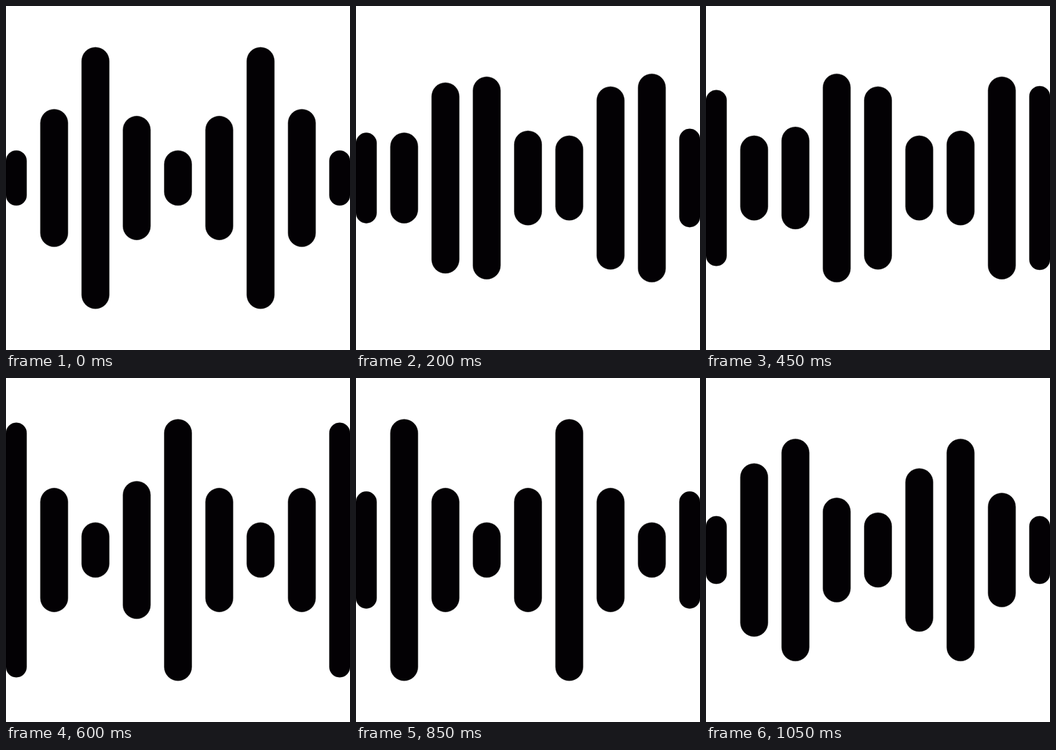
Write an HTML page that moves like this. It is 498x498 px and loops after 1.1 s.

```html
<!DOCTYPE html>
<html lang="en">
<head>
<meta charset="utf-8">
<title>Sound wave</title>
<style>
  html, body { margin: 0; width: 100%; height: 100%; overflow: hidden; background: #fff; }
  svg { display: block; width: 100vw; height: 100vh; }
  rect { fill: #030104; stroke: #030104; stroke-opacity: .4; }
</style>
</head>
<body>
<svg viewBox="0 0 500 500"></svg>
<script>
  const TICK = 50, TICKS = 22, SPAN = 7, LAST = 8;
  const WAVE = [40, 90, 190, 90];
  const svg = document.querySelector("svg");
  const isEdge = i => i % LAST === 0;

  const bars = Array.from({ length: LAST + 1 }, (_, i) => {
    const bar = document.createElementNS("http://www.w3.org/2000/svg", "rect");
    const width = isEdge(i) ? 30 : 40;
    bar.setAttribute("x", Math.max(0, i * 60 - 10));
    bar.setAttribute("width", width);
    bar.setAttribute("rx", width / 2);
    svg.append(bar);
    return bar;
  });

  // Half-height of bar i: the wave moves one bar to the right per pose
  function halfAt(i, pose) {
    const turn = pose % 4;
    const lift = turn < 3 && Math.abs(i - turn - 4) === 3 ? 10 : 0;
    const dip = isEdge(i) && pose > 0 ? 5 : 0;
    return WAVE[(i - turn + 4) % 4] + lift - dip;
  }

  // After the first four ticks, every third tick skips one step of the motion
  const stepAt = tick => tick + Math.max(0, Math.floor((tick - 4) / 3));

  function draw(ms) {
    const step = stepAt(Math.floor(ms / TICK) % TICKS);
    const pose = Math.floor(step / SPAN);
    const part = step % SPAN / SPAN;
    bars.forEach((bar, i) => {
      const half = halfAt(i, pose) * (1 - part) + halfAt(i, pose + 1) * part;
      bar.setAttribute("y", 250 - half);
      bar.setAttribute("height", half * 2);
    });
  }

  const start = performance.now();
  function loop() {
    draw(performance.now() - start);
    requestAnimationFrame(loop);
  }
  loop();
</script>
</body>
</html>
```
